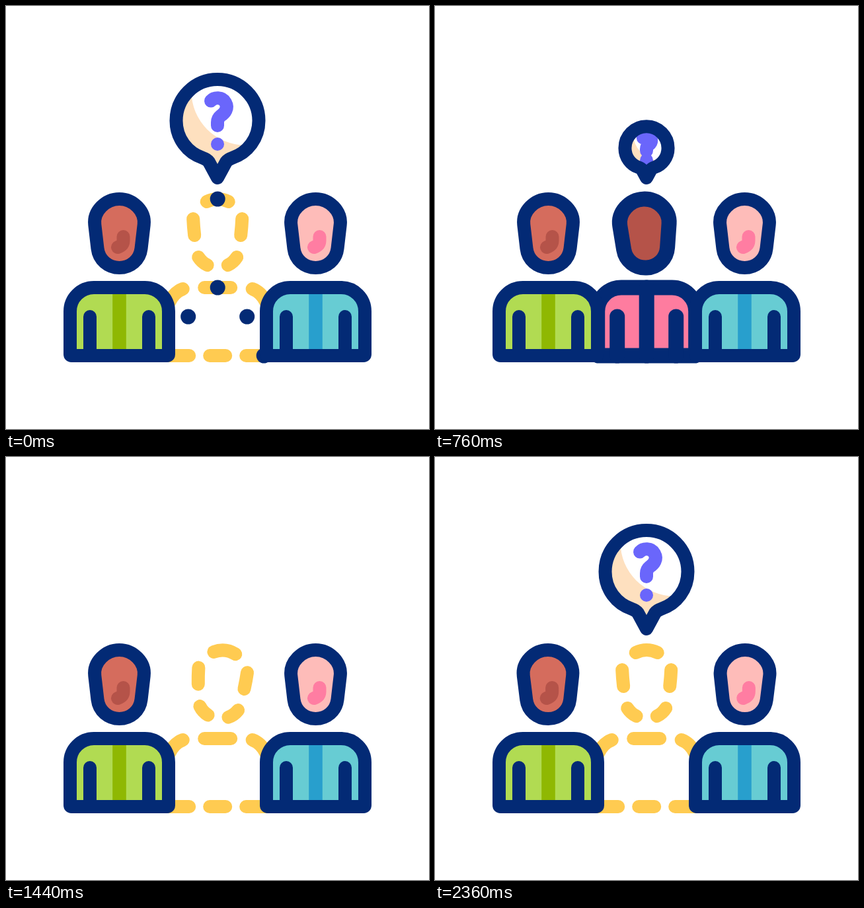
These frames come from a looping animation (640x640 px, 2.4 s). An HTML page:

```html
<!DOCTYPE html>
<html lang="en">
<head>
<meta charset="utf-8">
<title>Missing team member</title>
<style>
  html, body { margin: 0; width: 100%; height: 100%; overflow: hidden; background: #fff; }
  svg { display: block; width: 100%; height: 100%; fill: none; stroke-linecap: round; stroke-linejoin: round; }
</style>
</head>
<body>
<svg id="stage" viewBox="0 0 640 640"></svg>
<script>
const LOOP = 2400;
const NAVY = '#032a75';
const PIVOT_Y = 400;
const CENTER_X = 320.2;

// Figure parts are drawn around x = 0 and moved into place.
const HEAD = 'M0 292C-21 292-39.6 310.5-37.2 331L-33 367C-31 384-17 396 0 396' +
  'C17 396 31 384 33 367L37.2 331C39.6 310.5 21 292 0 292Z';
const EAR = 'M6 349V355Q6 362-2.5 365';
const ARMS = ['M-44.5 470V529', 'M44.5 470V529'];
const TIE = 'M0 426V529';
const BUBBLE = 'M320 260L307 236Q304 232 298 230C274 222 257.5 200 257.5 173.5' +
  'C257.5 139 285.5 111 320 111C354.5 111 382.5 139 382.5 173.5' +
  'C382.5 200 366 222 342 230Q336 232 333 236Z';
const QUESTION = 'M310 143.5C315 138 327 137 332 146C337 155 331 162 325 166Q320 170 320 176V181';

const torso = bottom =>
  `M70 ${bottom}H72.5Q74.5 ${bottom} 74.5 ${bottom - 2}V462A36 36 0 0 0 38.5 426H-38.5` +
  `A36 36 0 0 0-74.5 462V${bottom - 2}Q-74.5 ${bottom}-72.5 ${bottom}Z`;

const path = (d, attrs = '') => `<path d="${d}" ${attrs}/>`;
const group = (attrs, ...parts) => `<g ${attrs}>${parts.join('')}</g>`;
const at = x => `transform="translate(${x} 0)"`;

function sideFigure(id, x, skin, ear, shirt, stripe) {
  return group(at(x),
    group(`id="${id}"`,
      path(HEAD, `fill="${skin}"`),
      path(EAR, `stroke="${ear}" stroke-width="20"`),
      path(HEAD, `stroke="${NAVY}" stroke-width="20"`)),
    path(torso(529), `fill="${shirt}"`),
    path('M-10.3 426H10.3V529H-10.3Z', `fill="${stripe}"`),
    group(`stroke="${NAVY}" stroke-width="20"`, ...ARMS.map(d => path(d)), path(torso(529))));
}

const trimmed = d => path(d, 'class="trim" pathLength="1"');

const outlineHead = group('class="centerHead" stroke="#ffcb51" stroke-width="20"',
  path('M-16.5 296Q0 288 16.5 296'),
  ...[-1, 1].map(side => group(`transform="scale(${side} 1)"`,
    path('M37 322Q36.5 334 35 347'),
    path('M29 380Q24 388 15.5 392'))));

const outlineBody = group('stroke="#ffcb51" stroke-width="20"',
  path('M-20 426H20M-12 529H12'),
  ...[-1, 1].map(side => group(`transform="scale(${side} 1)"`,
    path('M52.5 428Q66 433 73 448M43 529H74'))));

const centerFigure = group(at(CENTER_X),
  outlineBody,
  outlineHead,
  path(torso(526), 'class="fill" fill="#fe7c9f"'),
  group('class="centerHead"',
    path(HEAD, 'class="fill" fill="#b55349" transform="translate(0 344) scale(.96) translate(0 -344)"'),
    group(`stroke="${NAVY}" stroke-width="23"`, trimmed(HEAD))),
  group(`stroke="${NAVY}" stroke-width="23"`,
    trimmed(torso(529)), trimmed(TIE), ...ARMS.map(trimmed)));

const bubble = group('id="bubble"',
  group('clip-path="url(#bubbleClip)"',
    path(BUBBLE, 'fill="#fee0bf"'),
    '<circle cx="362" cy="129" r="81.5" fill="#fff"/>',
    path(QUESTION + 'M320 209h.01', 'stroke="#6a66fb"')),
  path(BUBBLE, `stroke="${NAVY}"`));

const stage = document.getElementById('stage');
stage.innerHTML =
  `<clipPath id="bubbleClip">${path(BUBBLE)}</clipPath>` +
  centerFigure +
  sideFigure('leftHead', 171.5, '#d56c5d', '#b55349', '#b1db52', '#8fb802') +
  sideFigure('rightHead', 468.5, '#febcb9', '#ff7da2', '#67ccd3', '#289fcd') +
  bubble;

const all = selector => [...stage.querySelectorAll(selector)];
const [leftHead] = all('#leftHead');
const [rightHead] = all('#rightHead');
const [bubbleNode] = all('#bubble');
const centerHeads = all('.centerHead');
const fills = all('.fill');
const trims = all('.trim');

// Each track is a list of [time, value] keys, eased between neighbours.
const TRACKS = {
  centerTilt: [[0, 0], [400, 9], [1000, -9], [1600, 9], [2000, 0]],
  sideTilt: [[1440, 0], [1760, 10.5], [2080, 10.5], [2400, 0]],
  draw: [[0, 0], [350, 1], [1030, 1], [1440, 0]],
  fill: [[0, 0], [400, 1], [1000, 1], [1400, 0]],
  bubbleScale: [[320, 1], [560, 1.087], [600, 1.087], [852, 0.282], [1600, 0.282],
    [1840, 1.087], [2000, 1.087], [2240, 1]],
  bubbleAlpha: [[765, 1], [852, 0], [1600, 0], [1785, 1]]
};

function valueAt(keys, time) {
  const next = keys.findIndex(([keyTime]) => keyTime > time);
  if (next === 0) return keys[0][1];
  if (next < 0) return keys[keys.length - 1][1];
  const [t0, v0] = keys[next - 1];
  const [t1, v1] = keys[next];
  const u = (time - t0) / (t1 - t0);
  return v0 + (v1 - v0) * u * u * (3 - 2 * u);
}

function tilt(node, angle) {
  node.setAttribute('transform', `rotate(${angle} 0 ${PIVOT_Y})`);
}

function render(time) {
  const now = name => valueAt(TRACKS[name], time);

  centerHeads.forEach(node => tilt(node, now('centerTilt')));
  tilt(leftHead, -now('sideTilt'));
  tilt(rightHead, now('sideTilt'));

  const drawn = now('draw');
  trims.forEach(node => {
    node.setAttribute('visibility', drawn > 0 ? 'visible' : 'hidden');
    node.setAttribute('stroke-dasharray', drawn < 1 ? `${drawn} 2` : 'none');
  });
  fills.forEach(node => node.setAttribute('opacity', now('fill')));

  // The bubble grows from its tip while its line weight stays constant.
  const scale = now('bubbleScale');
  bubbleNode.setAttribute('transform', `translate(320 260) scale(${scale}) translate(-320 -260)`);
  bubbleNode.setAttribute('stroke-width', 20 / scale);
  bubbleNode.setAttribute('opacity', now('bubbleAlpha'));
}

const start = performance.now();
function tick() {
  render((performance.now() - start) % LOOP);
  requestAnimationFrame(tick);
}
tick();
</script>
</body>
</html>
```
